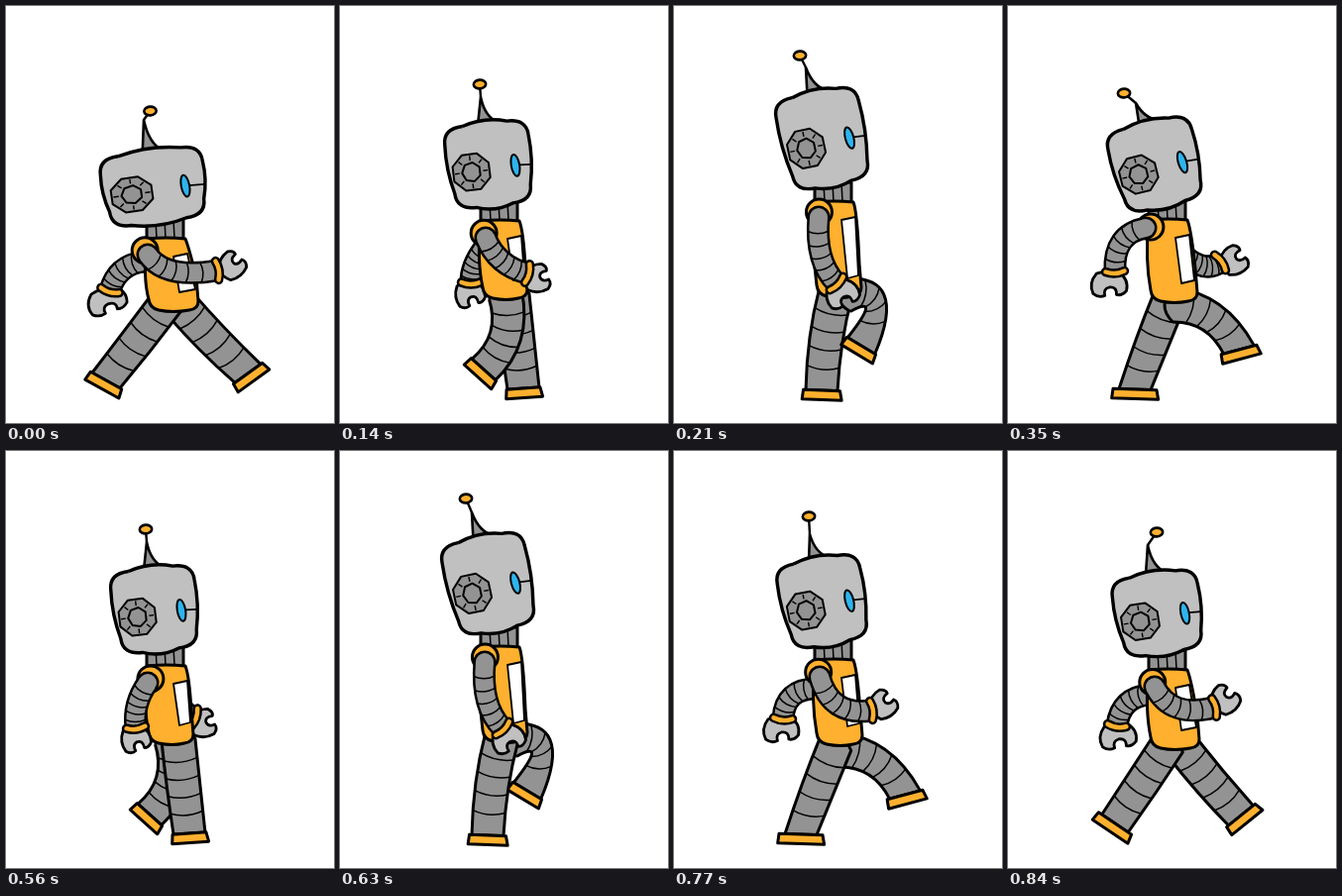
An HTML page with a canvas for the animation above (910 ms loop, 331x421 px).

```html
<!DOCTYPE html>
<html lang="en">
<head>
<meta charset="utf-8">
<title>Walking robot</title>
<style>
  html, body { margin: 0; width: 100%; height: 100%; overflow: hidden; background: #fff; }
  canvas { display: block; width: 100vw; height: 100vh; }
</style>
</head>
<body>
<canvas id="stage" width="331" height="421"></canvas>
<script>
const ctx = document.getElementById('stage').getContext('2d');
const LOOP = 910;
const INK = '#000', LIGHT = '#c0c0c0', DARK = '#939393', ORANGE = '#ffb02e', BLUE = '#2eb4ee';
const rad = deg => deg * Math.PI / 180;

// head: x, y, half width, half height, tilt; body: top, bottom, right edge
// arm: shoulder, bend, wrist; hand: x, y, opening angle, stretch
// leg: hip, bend, ankle, foot angle, foot length
const contactA = {
  head: [149.5, 182.5, 53, 39, -8], ball: [145.5, 106], tip: [139, 115], body: [235, 309, 195],
  near: { arm: [143, 251, 160, 276, 213, 267], hand: [228, 262, -50, .95] },
  far: { arm: [138, 258, 112, 262, 105, 287], hand: [102, 298, 70, 1.42] },
  nearLeg: [163, 298, 133, 338, 101, 378, 29, 40], farLeg: [175, 300, 207, 337, 244, 371, -36, 40]
};
const passA = {
  head: [151, 160, 43.5, 45, -7], ball: [141, 79], tip: [142, 92], body: [217, 297, 190],
  near: { arm: [147, 234, 158, 262, 189, 270], hand: [199, 275, -15, 1] },
  far: { arm: [145, 245, 132, 262, 132, 279], hand: [131, 291, 70, 1.05] },
  nearLeg: [167, 292, 178, 337, 145, 367, 42, 38], farLeg: [174, 292, 179, 340, 185, 386, -4, 38]
};
const reachA = {
  head: [149.5, 160, 44.5, 46, -14], ball: [117, 88], tip: [129, 98], body: [216, 300, 192],
  near: { arm: [139, 224, 106, 230, 108, 268], hand: [102, 281, 85, 1.3] },
  far: { arm: [180, 254, 200, 269, 214, 259], hand: [228, 257, -35, 1.02] },
  nearLeg: [167, 302, 210, 304, 233, 347, -15, 41], farLeg: [163, 296, 145, 340, 128, 387, 2, 48]
};
const contactB = {
  head: [145, 181.5, 51, 37.5, -18], ball: [103, 118], tip: [112, 122], body: [233, 314, 195],
  near: { arm: [141, 241, 102, 239, 93, 274], hand: [87, 285, 75, 1.32] },
  far: { arm: [182, 253, 212, 275, 238, 261], hand: [249, 248, -60, 1.12] },
  nearLeg: [170, 304, 207, 341, 245, 374, -42, 40], farLeg: [163, 308, 138, 345, 112, 380, 27, 47]
};
const highB = {
  head: [151, 134, 43.5, 50.5, -12], ball: [127, 48], tip: [133, 62], body: [198, 295, 190],
  near: { arm: [146, 213, 142, 258, 164, 280], hand: [170, 291, 65, 1.2] },
  nearLeg: [163, 290, 151, 335, 149, 388, 2, 41], farLeg: [174, 292, 224, 280, 189, 343, 31, 38]
};
const fallB = {
  head: [152, 164, 44.5, 43.5, -9], ball: [150, 82], tip: [141, 95], body: [221, 302, 194],
  near: { arm: [148, 238, 164, 270, 208, 259], hand: [219, 251, -55, 1.05] },
  far: { arm: [143, 246, 114, 248, 110, 277], hand: [111, 288, 80, 1.32] },
  nearLeg: [162, 295, 136, 335, 108, 376, 34, 44], farLeg: [175, 298, 204, 335, 235, 368, -39, 41]
};
// The other half of the stride swaps near and far limbs.
const highA = { ...highB, ball: [127, 50], nearLeg: highB.farLeg, farLeg: highB.nearLeg };
const passB = {
  ...passA,
  near: { arm: [143, 234, 128, 255, 131, 279], hand: passA.far.hand },
  far: { arm: [170, 245, 176, 264, 190, 269], hand: passA.near.hand },
  nearLeg: passA.farLeg, farLeg: passA.nearLeg
};
const reachB = {
  ...reachA,
  head: [151, 152, 43.5, 46.5, -11], ball: [136, 66], tip: [137, 84], body: [211, 298, 191],
  near: { arm: [147, 228, 158, 268, 199, 262], hand: [211, 256, -45, 1] },
  far: { arm: [143, 240, 112, 240, 110, 270], hand: [108, 281, 82, 1.28] },
  nearLeg: reachA.farLeg, farLeg: reachA.nearLeg
};
const steps = [
  [0, contactA], [140, passA], [210, highA], [350, reachA], [420, contactB],
  [560, passB], [630, highB], [770, reachB], [840, fallB]
];

function paint(fill, weight = 3) {
  ctx.fillStyle = fill;
  ctx.fill();
  ctx.strokeStyle = INK;
  ctx.lineWidth = weight;
  ctx.stroke();
}

function line(x0, y0, x1, y1, weight) {
  ctx.beginPath();
  ctx.moveTo(x0, y0);
  ctx.lineTo(x1, y1);
  ctx.strokeStyle = INK;
  ctx.lineWidth = weight;
  ctx.stroke();
}

function oval(x, y, rx, ry, tilt, fill, weight) {
  ctx.beginPath();
  ctx.ellipse(x, y, rx, ry, rad(tilt), 0, 7);
  paint(fill, weight);
}

function local(x, y, angle, draw) {
  ctx.save();
  ctx.translate(x, y);
  ctx.rotate(angle);
  draw();
  ctx.restore();
}

const bend = (a, b, c, t) => (1 - t) * (1 - t) * a + 2 * t * (1 - t) * b + t * t * c;
const unit = (x, y) => [x / Math.hypot(x, y), y / Math.hypot(x, y)];

function armTube([x0, y0, cx, cy, x1, y1]) {
  const width = 23, ribs = 5;
  for (const [w, color] of [[width, INK], [width - 5, DARK]]) {
    ctx.fillStyle = ctx.strokeStyle = color;
    ctx.beginPath();
    ctx.arc(x0, y0, w / 2, 0, 7);
    ctx.fill();
    ctx.lineWidth = w;
    ctx.beginPath();
    ctx.moveTo(x0, y0);
    ctx.quadraticCurveTo(cx, cy, x1, y1);
    ctx.stroke();
  }
  for (let i = 1; i <= ribs; i++) {
    const t = i / (ribs + 1), u = 1 - t;
    const angle = Math.atan2(u * (cy - y0) + t * (y1 - cy), u * (cx - x0) + t * (x1 - cx));
    local(bend(x0, cx, x1, t), bend(y0, cy, y1, t), angle, () => {
      ctx.beginPath();
      ctx.moveTo(0, 1 - width / 2);
      ctx.quadraticCurveTo(5, 0, 0, width / 2 - 1);
      ctx.strokeStyle = INK;
      ctx.lineWidth = 1.5;
      ctx.stroke();
    });
  }
}

function hand([x, y, deg, k]) {
  local(x, y, rad(deg), () => {
    ctx.beginPath();
    ctx.moveTo(-12, -8 * k);
    ctx.quadraticCurveTo(-3, -16 * k, 8, -13 * k);
    ctx.quadraticCurveTo(13, -9 * k, 11, -5 * k);
    ctx.quadraticCurveTo(3, -6 * k, 3, 0);
    ctx.quadraticCurveTo(4, 5 * k, 11, 4 * k);
    ctx.quadraticCurveTo(13, 9 * k, 8, 13 * k);
    ctx.quadraticCurveTo(-3, 16 * k, -12, 9 * k);
    ctx.quadraticCurveTo(-15, 0, -12, -8 * k);
    paint(LIGHT, 2.8);
  });
}

function limb(part, shoulder) {
  const [x0, y0, cx, cy, x1, y1] = part.arm;
  if (shoulder) {
    const [dx, dy] = unit(cx - x0, cy - y0);
    oval(x0 - 5 * dx, y0 - 5 * dy, 13, 13, 0, ORANGE, 3);
  }
  hand(part.hand);
  armTube(part.arm);
  local(x1, y1, Math.atan2(y1 - cy, x1 - cx), () => {
    ctx.lineCap = 'round';
    for (const [w, color] of [[9.5, INK], [4.5, ORANGE]]) {
      ctx.beginPath();
      ctx.moveTo(0, -9.5);
      ctx.quadraticCurveTo(4, 0, 0, 9.5);
      ctx.strokeStyle = color;
      ctx.lineWidth = w;
      ctx.stroke();
    }
  });
}

// The two sides run from the hip to the ends of the foot's upper edge.
function leg([hx, hy, cx, cy, ax, ay, deg, length]) {
  const half = 17, foot = rad(deg);
  const [ux, uy] = unit(cx - hx, cy - hy), [vx, vy] = unit(ax - cx, ay - cy);
  const [mx, my] = unit(ux + vx, uy + vy);
  const side = s => [
    hx - s * uy * half, hy + s * ux * half,
    cx - s * my * half, cy + s * mx * half,
    ax - s * Math.cos(foot) * 16, ay - s * Math.sin(foot) * 16
  ];
  const a = side(1), b = side(-1);
  ctx.beginPath();
  ctx.moveTo(a[0], a[1]);
  ctx.quadraticCurveTo(...a.slice(2));
  ctx.lineTo(b[4], b[5]);
  ctx.quadraticCurveTo(b[2], b[3], b[0], b[1]);
  ctx.quadraticCurveTo(hx - ux * 18, hy - uy * 18, a[0], a[1]);
  paint(DARK);

  for (let t = .2; t < .9; t += .19) {
    const px = bend(a[0], a[2], a[4], t), py = bend(a[1], a[3], a[5], t);
    const qx = bend(b[0], b[2], b[4], t), qy = bend(b[1], b[3], b[5], t);
    const [nx, ny] = unit(py - qy, qx - px);
    ctx.beginPath();
    ctx.moveTo(px, py);
    ctx.quadraticCurveTo((px + qx) / 2 + nx * 6, (py + qy) / 2 + ny * 6, qx, qy);
    ctx.lineWidth = 1.5;
    ctx.stroke();
  }

  local(ax, ay, foot, () => {
    const w = length / 2 - 1;
    ctx.beginPath();
    ctx.moveTo(1 - w, 0);
    ctx.lineTo(w - 1, 0);
    ctx.lineTo(w + 1, 9.5);
    ctx.lineTo(-w, 9.5);
    ctx.closePath();
    paint(ORANGE);
  });
}

function torso([top, bottom, right]) {
  ctx.beginPath();
  ctx.rect(142, top - 20, 37, 21);
  paint(DARK);
  for (const x of [151, 160, 169]) line(x, top - 20, x + 1, top, 1.5);

  ctx.beginPath();
  ctx.moveTo(142, top);
  ctx.quadraticCurveTo(162, top - 2, 181, top);
  ctx.quadraticCurveTo(185, top + 10, right - 3, bottom - 35);
  ctx.lineTo(right - 1, bottom - 11);
  ctx.quadraticCurveTo(right - 1, bottom - 3, right - 10, bottom - 2);
  ctx.quadraticCurveTo(168, bottom + 1, 154, bottom - 2);
  ctx.quadraticCurveTo(145, bottom - 4, 144, bottom - 13);
  ctx.quadraticCurveTo(138, top + 40, 142, top);
  paint(ORANGE);

  ctx.beginPath();
  ctx.moveTo(169, top + 18);
  ctx.lineTo(183, top + 15);
  ctx.lineTo(right - 4, bottom - 23);
  ctx.lineTo(175, bottom - 20);
  ctx.closePath();
  paint('#fff', 1.8);
}

function antenna([hx, hy, , hh, tilt], [bx, by], [tx, ty]) {
  const c = Math.cos(rad(tilt)), s = Math.sin(rad(tilt));
  const at = (x, y) => [hx + x * c - y * s, hy + x * s + y * c];
  const [mx, my] = at(2, 4 - hh);
  line(tx, ty, bx, by, 2.4);
  ctx.beginPath();
  ctx.moveTo(...at(-7, 4 - hh));
  ctx.lineTo(tx, ty);
  ctx.quadraticCurveTo(tx + (mx - tx) * .7, ty + (my - ty) * .75, ...at(14, 4 - hh));
  paint(DARK, 2.6);
  oval(bx, by, 6.2, 4.4, -4, ORANGE, 2.6);
}

function ring(n, rx, ry) {
  ctx.beginPath();
  for (let i = 0; i < n; i++) {
    const a = (i + .5) * 2 * Math.PI / n;
    ctx.lineTo(rx * Math.cos(a), ry * Math.sin(a));
  }
  ctx.closePath();
  paint(DARK, 2);
}

function head([x, y, w, h, tilt]) {
  local(x, y, rad(tilt), () => {
    const r = 20, b = 3.5, top = w - 1, low = w - 5;
    ctx.beginPath();
    ctx.moveTo(r - top, b - h);
    ctx.quadraticCurveTo(0, -h - b, top - r, b - h);
    ctx.quadraticCurveTo(top, b - h, top, r - h);
    ctx.quadraticCurveTo(w + 1, 0, low, h - r);
    ctx.quadraticCurveTo(low, h - b, low - r, h - b);
    ctx.quadraticCurveTo(0, h + b, r - low, h - b);
    ctx.quadraticCurveTo(-low, h - b, -low, h - r);
    ctx.quadraticCurveTo(-w - 1, 0, -top, r - h);
    ctx.quadraticCurveTo(-top, b - h, r - top, b - h);
    paint(LIGHT, 3.4);

    const eyeX = w * .59, eyeY = h * .09;
    line(eyeX + 4, eyeY, w - 2, eyeY + 1, 1.8);
    oval(eyeX, eyeY, 4.2, 11, -3, BLUE, 2);

    ctx.translate(-w * .44, h * .12);
    const rx = 8.5 + .26 * w, ry = 11 + .19 * h;
    ring(8, rx, ry);
    for (let i = 0; i < 8; i++) {
      const px = rx * Math.cos(i * Math.PI / 4), py = ry * Math.sin(i * Math.PI / 4);
      line(px * .6, py * .6, px * .84, py * .84, 1.4);
    }
    ring(7, rx * .48, ry * .5);
  });
}

function drawPose(p) {
  ctx.fillStyle = '#fff';
  ctx.fillRect(0, 0, 331, 421);
  ctx.lineJoin = 'round';
  ctx.lineCap = 'butt';
  if (p.far) limb(p.far, false);
  leg(p.farLeg);
  leg(p.nearLeg);
  torso(p.body);
  antenna(p.head, p.ball, p.tip);
  head(p.head);
  limb(p.near, true);
}

function frame(now) {
  const t = now % LOOP;
  drawPose(steps.filter(([start]) => start <= t).pop()[1]);
  requestAnimationFrame(frame);
}
frame(0);
</script>
</body>
</html>
```
